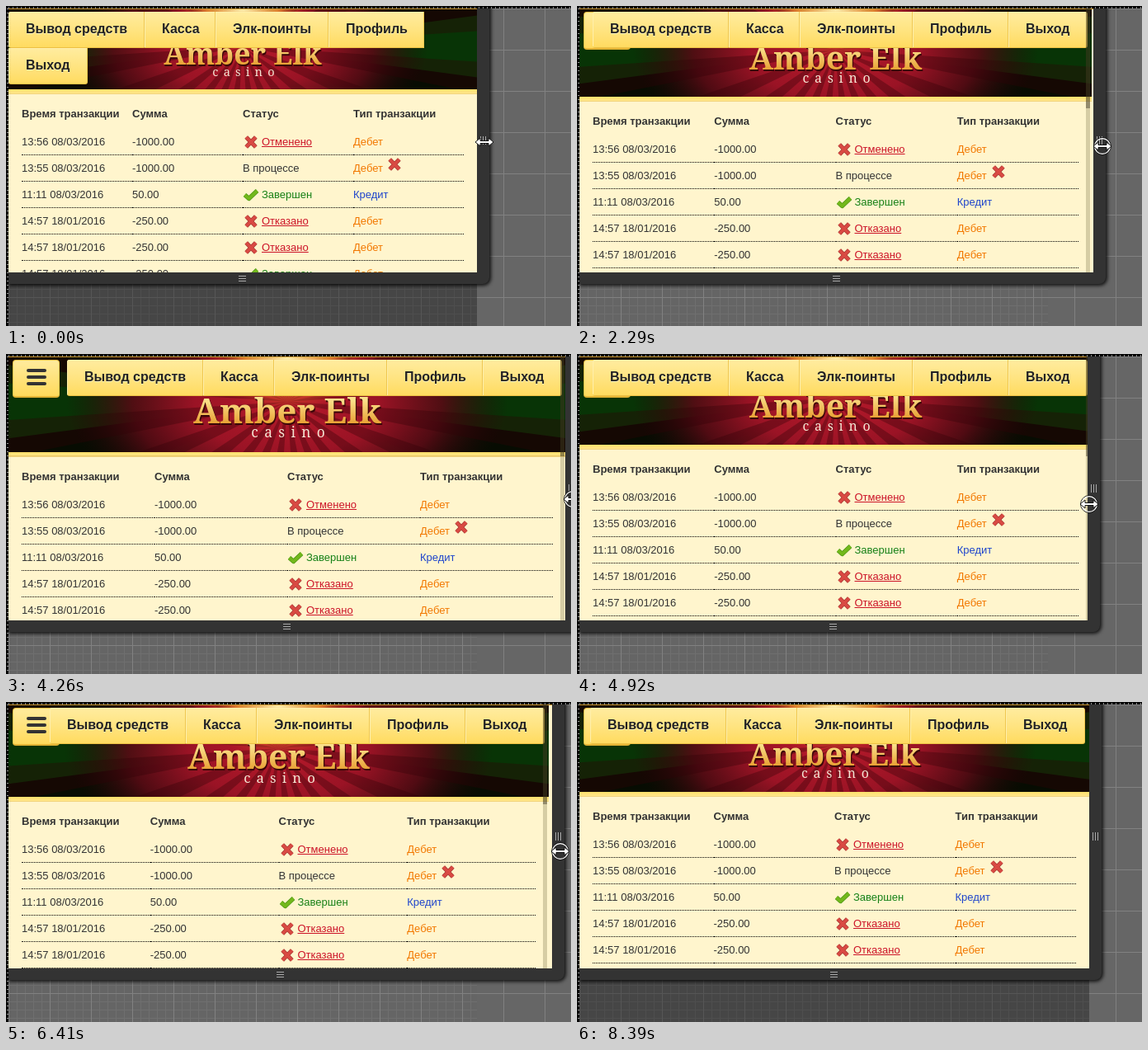
An HTML page that plays this animation: 685x388 px, repeating every 9.1 s.

```html
<!DOCTYPE html>
<html lang="ru">
<head>
<meta charset="utf-8">
<title>Resizable page preview</title>
<style>
html, body { margin: 0; width: 100%; height: 100%; overflow: hidden; }
body { font: 13px "Liberation Sans", Arial, sans-serif; color: #333; }
div, svg { position: absolute; box-sizing: border-box; }
#stage {
  left: 0; top: 0; width: 685px; height: 388px; overflow: hidden; background: #666;
}
#major {
  inset: 0;
  background:
    linear-gradient(90deg, #818181 1px, transparent 1px) 3px 3px / 50px 50px,
    linear-gradient(#818181 1px, transparent 1px) 3px 3px / 50px 50px;
}
#fine, #dark { left: 3px; top: 323px; height: 65px; }
#fine {
  width: 568px;
  background:
    linear-gradient(90deg, #818181 1px, transparent 1px) 0 30px / 50px 50px,
    linear-gradient(#818181 1px, transparent 1px) 0 30px / 50px 50px,
    linear-gradient(90deg, #6f6f6f 1px, transparent 1px) 0 0 / 10px 10px,
    linear-gradient(#6f6f6f 1px, transparent 1px) 0 0 / 10px 10px, #656565;
}
#dark {
  background:
    linear-gradient(90deg, #565656 1px, transparent 1px) 0 30px / 50px 50px,
    linear-gradient(#565656 1px, transparent 1px) 0 30px / 50px 50px,
    linear-gradient(90deg, #4e4e4e 1px, transparent 1px) 0 0 / 10px 10px,
    linear-gradient(#4e4e4e 1px, transparent 1px) 0 0 / 10px 10px, #464646;
}
#device {
  left: 3px; top: 0; height: 337px; background: #333;
  border-radius: 0 0 8px 0; box-shadow: 1px 1px 4px 1px rgba(0,0,0,.85);
}
#gripX {
  top: 158px; width: 7px; height: 10px;
  background: repeating-linear-gradient(90deg, #aaa 0 1px, transparent 1px 3px);
}
#gripY {
  top: 327px; width: 9px; height: 7px;
  background: repeating-linear-gradient(#aaa 0 1px, transparent 1px 3px);
}
#page {
  left: 3px; top: 3px; height: 320px; overflow: hidden; background: #fff5cd;
}
#banner { left: 0; top: 0; }
#topline { left: 0; top: 0; width: 100%; height: 1px; background: #c9952a; }
#strip {
  left: 0; height: 6px;
  background: linear-gradient(#ffe06a, #ffe588 75%, #e9c765 75%, #f6dc8c);
}
#table { left: 16px; }
.row {
  left: 0; width: 100%; height: 32px; display: grid; grid-template-columns: repeat(4, 25%);
  line-height: 31px; white-space: nowrap;
}
.row > span { position: relative; border-bottom: 1px dotted #000; }
.head > span { border: 0; font-weight: bold; }
.icon { position: absolute; left: 0; top: 6px; width: 20px; height: 20px; }
.mark { padding-left: 23px; }
.bad { color: #cc1428; text-decoration: underline; }
.good { color: #168016; }
.debit { color: #f27800; }
.credit { color: #1f45cc; }
#burger {
  left: 5px; top: 4px; width: 57px; height: 46px; border-radius: 4px;
  background: linear-gradient(#ffeb9c, #ffda5c); border: 1px solid #f0c548;
  border-bottom: 2px solid #e4b436;
}
#burger i {
  position: absolute; left: 16px; width: 24px; height: 4px; border-radius: 2px; background: #333;
}
#menu { top: 4px; }
.item {
  height: 44px; font: bold 16px/42px "Liberation Sans", Arial, sans-serif; color: #222;
  padding-left: 21px; white-space: nowrap; text-shadow: 0 1px 0 #fff3bf;
  background: linear-gradient(#ffec9f, #ffe482 50%, #ffdb60);
  border-bottom: 1px solid #ecc044; border-right: 1px solid #efc750;
  box-shadow: inset 1px 1px 0 #ffefac;
}
#track { top: 0; width: 5px; height: 320px; background: rgba(110,100,60,.28); }
#thumb { left: 0; top: 0; width: 5px; height: 121px; background: rgba(40,36,20,.38); }
#rulerX {
  left: 0; top: 0; width: 685px; height: 3px;
  background: repeating-linear-gradient(90deg, transparent 0 3px, #999 3px 4px, transparent 4px 5px) 0 1px / 100% 2px no-repeat, #000;
}
#rulerY {
  left: 0; top: 0; width: 3px; height: 388px;
  background: repeating-linear-gradient(transparent 0 3px, #999 3px 4px, transparent 4px 5px) 1px 0 / 2px 100% no-repeat, #000;
}
#cursor { width: 26px; height: 26px; }
</style>
</head>
<body>
<div id="stage">
  <div id="major"></div>
  <div id="fine"></div>
  <div id="dark"></div>
  <div id="device"></div>
  <div id="gripX"></div>
  <div id="gripY"></div>
  <div id="page">
    <svg id="banner" viewBox="0 0 568 98" preserveAspectRatio="xMidYMin slice">
      <defs>
        <radialGradient id="core" gradientUnits="userSpaceOnUse" cx="0" cy="0" r="1"
          gradientTransform="translate(284 46) scale(225 130)">
          <stop offset="0" stop-color="#b81a2b"/>
          <stop offset=".42" stop-color="#9a1325"/>
          <stop offset=".7" stop-color="#560b14" stop-opacity=".92"/>
          <stop offset="1" stop-color="#200606" stop-opacity="0"/>
        </radialGradient>
        <radialGradient id="glow">
          <stop offset="0" stop-color="#fff3b0"/>
          <stop offset=".5" stop-color="#f0a030" stop-opacity=".8"/>
          <stop offset="1" stop-color="#c02020" stop-opacity="0"/>
        </radialGradient>
        <linearGradient id="gold" x1="0" y1="0" x2="0" y2="1">
          <stop offset=".3" stop-color="#fbe08a"/>
          <stop offset=".8" stop-color="#e8a033"/>
        </linearGradient>
      </defs>
      <rect width="568" height="98" fill="#083406"/>
      <g id="outer" fill="#080502" opacity=".85"></g>
      <rect width="568" height="98" fill="url(#core)"/>
      <g id="inner" fill="#300208" opacity=".34"></g>
      <ellipse cx="284" cy="0" rx="85" ry="58" fill="url(#glow)"/>
      <g text-anchor="middle">
        <g font-family="'Noto Serif', serif" font-weight="bold" font-size="35.6">
          <text x="285" y="69.5" fill="#3a0508">Amber Elk</text>
          <text x="284" y="68" fill="url(#gold)">Amber Elk</text>
        </g>
        <text x="288" y="82" font-family="'Noto Serif', serif" font-size="14.5" letter-spacing="6.2" fill="#f4e6d4">casino</text>
      </g>
    </svg>
    <div id="topline"></div>
    <div id="strip"></div>
    <div id="table"></div>
    <div id="burger"><i style="top:10px"></i><i style="top:18px"></i><i style="top:26px"></i></div>
    <div id="menu"></div>
    <div id="track"><div id="thumb"></div></div>
  </div>
  <div id="rulerX"></div>
  <div id="rulerY"></div>
  <svg id="cursor" viewBox="-13 -13 26 26">
    <g id="ring" fill="none">
      <circle r="10.4" stroke="#111"/>
      <circle r="9.4" stroke="#fff" stroke-width="1.2"/>
    </g>
    <path d="M-11 0L-5-5V-1.5H5V-5L11 0L5 5V1.5H-5V5Z" fill="#fff" stroke="#111"/>
  </svg>
</div>
<script>
const LOOP = 9100, GRAB = 130, MOVE = 800, DROP = 8390;
const $ = id => document.getElementById(id);

// Light beams leaving the centre of the banner, mirrored left and right
function beams(count) {
  let d = "";
  const point = a => `${284 + 420 * Math.cos(a)} ${46 + 420 * Math.sin(a)}`;
  for (let i = 0; i < count; i++) {
    const a = (i + .25) * 2 * Math.PI / count;
    d += `M284 46L${point(a)}L${point(a + Math.PI / count)}Z`;
  }
  return `<path d="${d}"/>`;
}
$("outer").innerHTML = beams(12);
$("inner").innerHTML = beams(24);

const stroke = (d, color, width) =>
  `<path d="${d}" fill="none" stroke="${color}" stroke-width="${width}" stroke-linejoin="round"/>`;
function icon(d, edge, fill, style = "") {
  return `<svg class="icon" style="${style}" viewBox="0 0 20 20">` +
    stroke(d, edge, 5.2) + stroke(d, fill, 3.8) + "</svg>";
}
const cross = style => icon("M4.2 4L15.8 16M15.8 4L4.2 16", "#a63a36", "#d94a43", style);
const check = icon("M2.5 10L7.5 14.5L17.5 5", "#4b9414", "#72b81c");

const bad = text => `${cross()}<span class="mark"><span class="bad">${text}</span></span>`;
const good = `${check}<span class="mark good">Завершен</span>`;
const debit = '<span class="debit">Дебет</span>';
const credit = '<span class="credit">Кредит</span>';
const rows = [
  ["13:56 08/03/2016", "-1000.00", bad("Отменено"), debit],
  ["13:55 08/03/2016", "-1000.00", "В процессе", debit + cross("left:40px;top:1px")],
  ["11:11 08/03/2016", "50.00", good, credit],
  ["14:57 18/01/2016", "-250.00", bad("Отказано"), debit],
  ["14:57 18/01/2016", "-250.00", bad("Отказано"), debit],
  ["14:57 18/01/2016", "-250.00", good, debit],
];
const rowHtml = (cells, top, cls = "") =>
  `<div class="row ${cls}" style="top:${top}px">${cells.map(c => `<span>${c}</span>`).join("")}</div>`;
$("table").innerHTML =
  rowHtml(["Время транзакции", "Сумма", "Статус", "Тип транзакции"], 14, "head") +
  rows.map((r, i) => rowHtml(r, 48 + 32 * i)).join("");

const labels = ["Вывод средств", "Касса", "Элк-поинты", "Профиль", "Выход"];
const edges = [0, 165, 251, 388, 504, 600];
$("menu").innerHTML = labels.map((text, i) =>
  `<div class="item" style="left:${edges[i]}px;width:${edges[i + 1] - edges[i]}px">${text}</div>`).join("");
const items = [...$("menu").children];
items[0].style.borderRadius = "3px 0 0 3px";
const last = items[4];

// Moments at which the picture refreshes
const ticks = [
  0, 130, 270,
  800, 930, 1060, 1200, 1330, 1460, 1600, 1730,
  1880, 2010, 2150, 2290, 2440, 2590, 2730, 2870,
  2990, 3110, 3240, 3380, 3500, 3620, 3740, 3860,
  4260, 4400, 4530, 4660, 4790, 4920, 5070, 5220,
  5350, 5530, 5700, 5870, 6020, 6140, 6260,
  6410, 6540, 6670, 6810, 6950, 7090, 7220, 7340,
  7490, 7640, 7790, 7940, 8090, 8240, 8390,
];
// time, device edge, layout edge, pointer x, pointer y
const path = [
  [0, 571, 571, 580, 165],
  [670, 571, 571, 580, 165],
  [1730, 613, 611, 622, 168],
  [2290, 626, 624, 637, 170],
  [2870, 648, 647, 658, 171],
  [3380, 667, 667, 692, 172],
  [3860, 690, 690, 700, 174],
  [4130, 690, 690, 700, 175],
  [4920, 619, 624, 621, 182],
  [5220, 596, 599, 600, 183],
  [5700, 573, 574, 588, 183],
  [5870, 579, 578, 617, 183],
  [6260, 650, 645, 663, 182],
  [6540, 672, 670, 680, 181],
  [7220, 687, 687, 683, 180],
  [7340, 688, 688, 690, 180],
  [8240, 625, 627, 633, 170],
  [8390, 621, 621, 629, 168],
];

function pose(t) {
  const i = path.findIndex(p => p[0] > t);
  if (i < 0) return path[path.length - 1].slice(1);
  const a = path[i - 1], b = path[i], k = (t - a[0]) / (b[0] - a[0]);
  return a.slice(1).map((v, n) => Math.round(v + (b[n + 1] - v) * k));
}

const css = (id, props) => {
  for (const [key, v] of Object.entries(props)) $(id).style[key] = v + "px";
};
const show = (id, on) => { $(id).style.visibility = on ? "visible" : "hidden"; };

function draw(now) {
  const time = now % LOOP;
  const t = ticks.filter(x => x <= time).pop();
  const [edge, right, x, y] = pose(t);
  const bottom = Math.round(6.3 + (right - 3) / 6);
  const dragging = t >= GRAB && t < DROP;
  const scrolls = t >= MOVE && t < DROP;

  show("fine", dragging);
  show("dark", !dragging);
  show("ring", dragging);
  show("cursor", t < DROP);
  show("track", scrolls);
  show("thumb", scrolls);

  css("dark", { width: right - 3 });
  css("device", { width: edge + 12 });
  css("gripX", { left: edge + 4 });
  css("gripY", { left: Math.round((edge + 3) / 2) - 5 });
  css("page", { width: edge - 3 });
  css("banner", { width: right - 3, height: bottom - 3 });
  css("strip", { top: bottom - 3, width: right - 3 });
  css("table", { top: bottom - 3, width: right - 35 });
  css("track", { left: right - 10 });
  css("cursor", { left: x - 13, top: y - 13 });

  // The last menu item drops to a second line when space runs out
  const wrapped = right < 608;
  css("menu", { left: wrapped ? 0 : right - 608 });
  last.style.left = (wrapped ? 0 : edges[4]) + "px";
  last.style.top = wrapped ? "44px" : "0";
  last.style.borderRadius = wrapped ? "0 0 3px 3px" : "0 3px 3px 0";
}

const start = performance.now();
function loop() {
  draw(performance.now() - start);
  requestAnimationFrame(loop);
}
loop();
</script>
</body>
</html>
```
